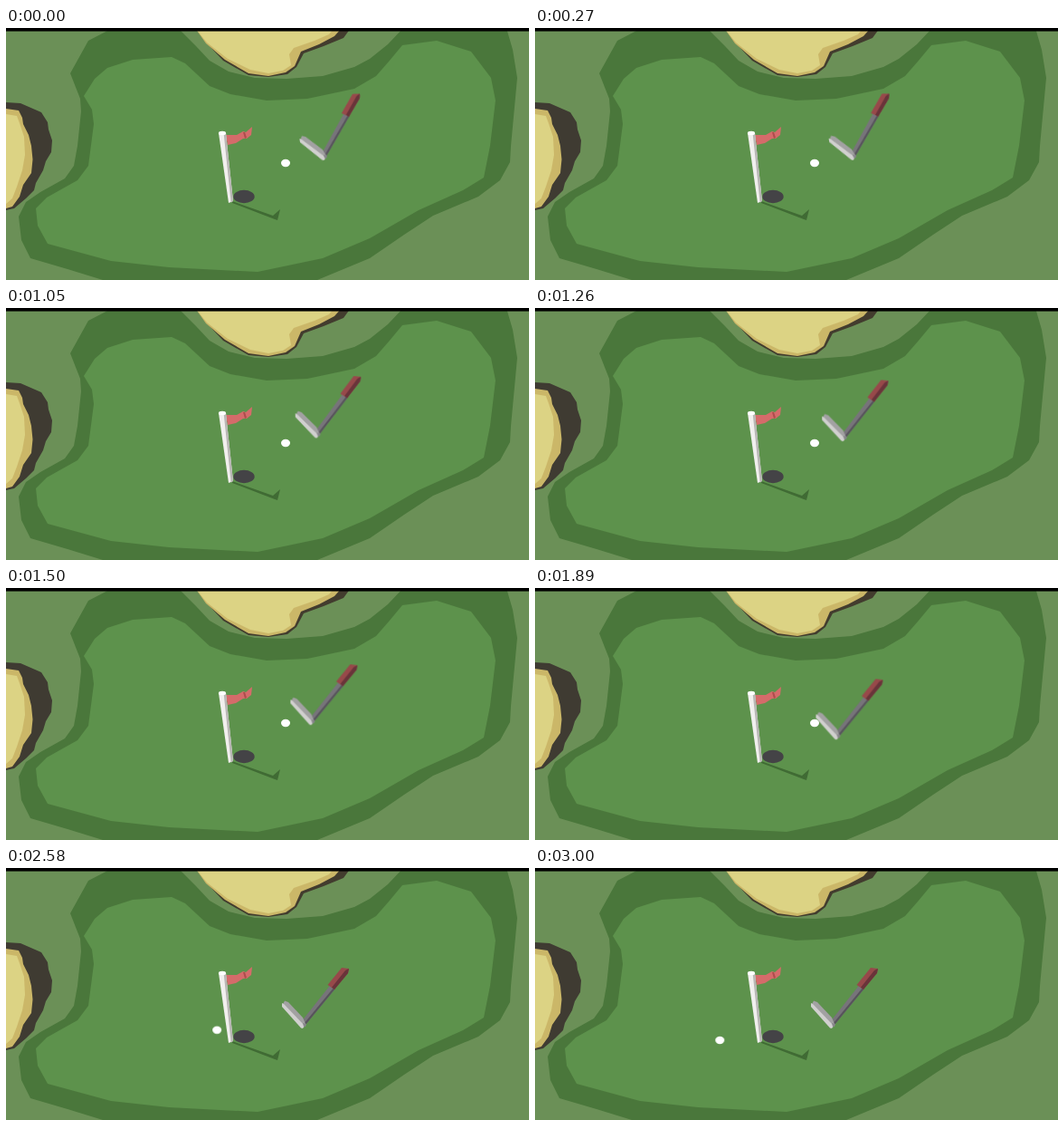
Animation, 578 px wide and 278 px high, one loop 3.1 s. Source, as an HTML page:

```html
<!DOCTYPE html>
<html lang="en">
<head>
<meta charset="utf-8">
<title>Putting green</title>
<style>
  html, body { margin: 0; width: 100%; height: 100%; overflow: hidden; background: #6b9057; }
  svg { display: block; width: 100%; height: 100%; }

  .club, .ball { animation: 3100ms linear infinite; }
  .club { animation-name: swing; }
  .ball { animation-name: roll; }

  /* The club's origin is its heel, where the shaft meets the head. */
  @keyframes swing {
    0%, 2.903% { transform: translate(351px, 142px) rotate(-9.5deg); animation-timing-function: ease-in; }
    17.419% { transform: translate(352px, 141px) rotate(-9deg); }
    33.871% { transform: translate(343.5px, 139.5px) rotate(-2deg); }
    48.387% { transform: translate(337.4px, 147.2px) rotate(0deg); }
    60.968% { transform: translate(333.5px, 163.3px) rotate(0deg); animation-timing-function: cubic-bezier(.3, .4, .6, 1); }
    70.968%, 100% { transform: translate(328px, 173px) rotate(0deg); }
  }

  /* Constant deceleration after the hit. */
  @keyframes roll {
    0%, 61.29% { transform: translate(309px, 149px); animation-timing-function: cubic-bezier(.333, .482, .667, .816); }
    96.774%, 100% { transform: translate(204.3px, 190px); }
  }
</style>
</head>
<body>
<svg viewBox="0 0 578 278">
  <rect width="578" height="278" fill="#6b9057"/>

  <!-- fringe and green -->
  <path fill="#4a773b" d="M118 0L91 14L71 50L82 78L83 92L79 130L75 152L65 166L38 181L22 192L14 208L17 234L27 254L68 266L107 278H344L402 254L440 228L472 207L522 186L546 168L557 148L558 130L565 55L560 24L553 0H439L422 18L402 34L385 43L350 53L310 56L275 55L246 48L225 36L210 20L190 0Z"/>
  <path fill="#5d924c" d="M86 75L98 56L112 44L140 35L183 32L198 39L225 64L248 73L288 80L333 78L385 67L409 53L423 37L438 19L476 14L514 26L536 55L541 80L535 130L528 165L505 179L456 201L402 232L350 254L278 269L180 264L116 257L46 238L35 218L33 199L45 187L79 168L91 152L97 106L95 90Z"/>

  <!-- top bunker -->
  <path fill="#423c2e" d="M210 0L222 17L240 36L268 52L290 54L311 51L321 43L329 28L351 20L373 11L381 0Z"/>
  <path fill="#cbb768" d="M209 0L221 17L242 35L268 50L290 53L309 49L319 42L326 26L346 18L363 9L371 0Z"/>
  <path fill="#dcd384" d="M209 0L222 16L245 34L270 46L290 50L306 47L315 41L313 29L318 22L341 14L357 7L363 0Z"/>

  <!-- left bunker -->
  <path fill="#3f3b32" d="M0 82L16 83L39 93L46 104L47 112L51 124L50 137L44 147L41 157L33 171L31 179L22 188L9 199L0 201Z"/>
  <path fill="#cbb768" d="M0 89L14 91L18 99L19 106L25 118L28 130L29.5 145L28 160L19 173L15 186L7 197L0 199Z"/>
  <path fill="#dcd384" d="M0 95L12 97L15 105L20 120L21 140L18 157L12 175L7 188L0 194Z"/>

  <!-- hole and flag shadow -->
  <path fill="#406b34" d="M250 191L295 207L303 200L300 212L297 211L250 193Z"/>
  <ellipse cx="263" cy="186" rx="11.7" ry="7.2" fill="#444346"/>

  <g class="club">
    <path fill="#77747a" d="M30.5 -44L36 -40L3 0L-2 -3Z"/>
    <path fill="#57545b" d="M34.5 -41.5L36 -40L3 0L1 -1Z"/>
    <path fill="#97494a" d="M43 -63L51 -62L50 -57L35 -39L27.5 -44Z"/>
    <path fill="#69343a" d="M51 -62L50 -57L35 -39L32 -41.2L47 -60Z"/>
    <path fill="#a2a1a2" d="M-20 -26.5L-16 -25L0 -8L3 -1L1 3L-3 0L-22.5 -22Z"/>
    <path fill="#d1d0cf" d="M-23 -24L-21 -23L2 1L0 4L-2 3.5L-23 -20Z"/>
    <path fill="#87858a" d="M0 -2L4 -1L3 2L1 2Z"/>
  </g>

  <ellipse class="ball" rx="5" ry="4.2" fill="#fff"/>

  <!-- flag -->
  <path fill="#d56b6a" d="M243 118L255 118L262 114L265 115L272 109L271 118L266 122L262 122L254 127L245 129Z"/>
  <path fill="#ae4d4c" d="M262 115L264 115L266 121L264 122Z"/>
  <path fill="#f1efee" d="M235 116L243 116L251 191L246 193Z"/>
  <path fill="#b8b6b4" d="M240.7 117L243 116L251 191L248.7 192.5Z"/>
  <ellipse cx="239" cy="116" rx="4.1" ry="2.2" fill="#fff"/>

  <rect width="578" height="3.6" fill="#000"/>
</svg>
</body>
</html>
```
